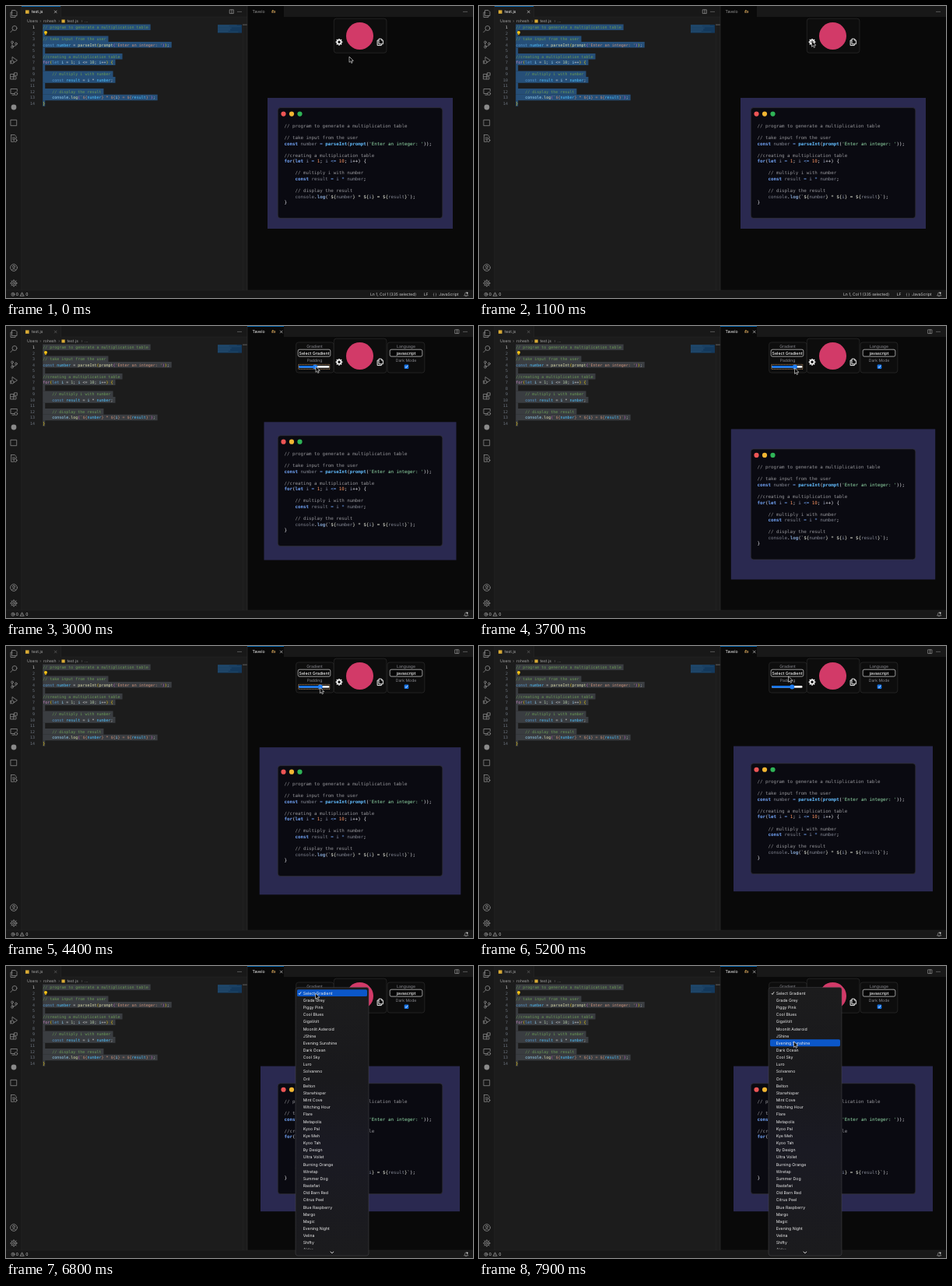
An HTML page for the animation above (8000 ms loop, 600 by 375 pixels).

```html
<!DOCTYPE html>
<html lang="en">
<head>
<meta charset="utf-8">
<title>Code preview</title>
<style>
html, body { margin: 0; width: 100%; height: 100%; overflow: hidden; background: #1c1c1c; }
svg { display: block; width: 100%; height: 100%; }
text { white-space: pre; text-rendering: geometricPrecision; font-family: Inter, Roboto, sans-serif; }
.mono { font-family: "DejaVu Sans Mono", "Liberation Mono", monospace; }
.icon { fill: none; stroke: #8a8a8a; stroke-width: .8; stroke-linejoin: round; stroke-linecap: round; }
</style>
</head>
<body>
<svg id="stage" viewBox="0 0 600 375" preserveAspectRatio="none"></svg>
<script>
const LOOP = 8000, STEP = 100;
const FOCUS_AT = 1400, DRAG_AT = 2800, DRAG_END = 4900, MENU_AT = 6200;
const ROW = 9.16, ROW_TOP = 30.2;

// Each piece of code starts with a one-letter token class
const CODE = [
  "m// program to generate a multiplication table",
  "",
  "m// take input from the user",
  "kconst|p |vnumber|o = |fparseInt|b(|fprompt|d(|s'Enter an integer: '|d)|b)|p;",
  "",
  "m//creating a multiplication table",
  "wfor|b(|klet|p |ii|o = |n1|p; |ii|o <= |n10|p; |ii|p++|b) {",
  "",
  "p    |m// multiply i with number",
  "p    |kconst|p |vresult|o = |ii|o * |vnumber|p;",
  "",
  "p    |m// display the result",
  "p    |cconsole|p.|glog|d(|q`${|vnumber|q} * ${|ii|q} = ${|vresult|q}`|d)|p;",
  "b}"
].map(l => l ? l.split("|").map(s => [s[0], s.slice(1)]) : []);

const EDITOR = { m: "#6a9955", k: "#569cd6", w: "#c586c0", v: "#4fc1ff", f: "#dcdcaa", s: "#ce9178",
  n: "#b5cea8", i: "#9cdcfe", c: "#9cdcfe", g: "#dcdcaa", q: "#ce9178", p: "#d4d4d4", o: "#d4d4d4",
  b: "#ffd700", d: "#da70d6" };
const PREVIEW = { m: "#96969a", k: "#74a6fa", w: "#74a6fa", v: "#828692", f: "#62bbfc", s: "#96e0ac",
  n: "#f5905f", i: "#8e96b0", c: "#828692", g: "#84a4d0", q: "#e4e6d8", p: "#ececf2", o: "#74a6fa",
  b: "#ececf2", d: "#ececf2" };

const GRADIENTS = ["Select Gradient", "Grade Grey", "Piggy Pink", "Cool Blues", "GigaVolt",
  "Moonlit Asteroid", "JShine", "Evening Sunshine", "Dark Ocean", "Cool Sky", "Luro", "Solvareno",
  "Oril", "Belton", "Starwhisper", "Mint Cove", "Witching Hour", "Flare", "Metapolis", "Kyoo Pal",
  "Kye Meh", "Kyoo Tah", "By Design", "Ultra Voilet", "Burning Orange", "Wiretap", "Summer Dog",
  "Rastafari", "Old Barn Red", "Citrus Peel", "Blue Raspberry", "Margo", "Magic", "Evening Night",
  "Velina", "Shifty"];

const esc = s => s.replace(/&/g, "&amp;").replace(/</g, "&lt;");
const rect = (x, y, w, h, fill, more = "") =>
  `<rect x="${x}" y="${y}" width="${w}" height="${h}" fill="${fill}" ${more}/>`;
const dot = (x, y, r, fill, more = "") => `<circle cx="${x}" cy="${y}" r="${r}" fill="${fill}" ${more}/>`;
const path = (d, more = "") => `<path d="${d}" ${more}/>`;
const text = (x, y, s, fill = "#ccc", size = 5.2, more = "") =>
  `<text x="${x}" y="${y}" font-size="${size}" fill="${fill}" xml:space="preserve" ${more}>${esc(s)}</text>`;
const group = (id, body, more = "") => `<g id="${id}" ${more}>${body}</g>`;
const icon = (x, y, d) => `<g class="icon" transform="translate(${x} ${y})">${d}</g>`;
const mid = 'text-anchor="middle"';
const lineLength = line => line.reduce((sum, [, s]) => sum + s.length, 0);

function code(x, y, pitch, size, colors, bold) {
  return CODE.map((line, n) => {
    const spans = line.map(([k, s]) =>
      `<tspan fill="${colors[k]}"${bold.includes(k) ? ' font-weight="700"' : ""}>${esc(s)}</tspan>`).join("");
    return `<text class="mono" x="${x}" y="${y + n * pitch}" font-size="${size}" xml:space="preserve">${spans}</text>`;
  }).join("");
}

const gear = (ring, tip) => dot(0, 0, ring, "none") +
  [...Array(8)].map((_, k) => path(`M0 ${-ring}V${-tip}`, `transform="rotate(${k * 45})"`)).join("");
const close = (x, color) => path(`M${x - 1.7} 5.8l3.4 3.4m0-3.4l-3.4 3.4`, `stroke="${color}" stroke-width=".7"`);
const dots = x => [-2, 0, 2].map(d => dot(x + d, 7.3, .5, "#bbb")).join("");
const split = x => icon(x, 7.2, path("M-2.4 -2.4h4.8v4.8h-4.8zM0 -2.4v4.8"));

function sidebar() {
  return rect(0, 0, 20, 365, "#181818") + rect(19.6, 0, .5, 365, "#292929") +
    icon(10, 10, path("M-2 -4.5h4l2 2v5h-6zM-2 -2h-2v6.5h6v-2")) +
    icon(10, 29.5, dot(1, -1, 3, "none") + path("M-1.2 1.2L-4.3 4.3")) +
    icon(10, 49.5, dot(-2, -3, 1.4, "none") + dot(-2, 3.2, 1.4, "none") + dot(3, -1, 1.4, "none") +
      path("M-2 -1.5v3.2M3 .5q0 1.7-4.3 1.7")) +
    icon(10, 70, path("M-2 -1v-3.6l6.4 4.3-4 2.8") + dot(-1.8, 2, 2, "none") + path("M-4.6 .4h1M-4.8 2h1M-4.6 3.8h1")) +
    icon(10, 90, path("M-4 -2.5h3.8v6.5h-3.8zM-4 .8h7v3.2h-3.2M.9 -4.2h3.4v3.4h-3.4z")) +
    icon(10, 110, path("M1 2.5h-5v-6h8.3v3M-2 4.2h2.5") + dot(2.8, 2.6, 1.9, "none")) +
    dot(10, 130, 3.4, "#8a8a8a") +
    icon(10, 150, path("M-3.7 -3.7h7.4v7.4h-7.4z")) +
    icon(10, 170, path("M-3.4 -4.5h4.5l2.2 2.2v2M-3.4 -4.5v8.8h3M-1.6 -1h3M-1.6 1h1.6") + dot(2, 2.5, 2, "none")) +
    icon(10, 336, dot(0, 0, 4.4, "none") + dot(0, -1.2, 1.5, "none") + path("M-2.8 3.2q2.8-3.6 5.6 0")) +
    icon(10, 356, gear(3.3, 4.4) + dot(0, 0, 1.4, "none"));
}

function editor() {
  const y0 = 29, pitch = 7.52, cw = 3.01;
  const sel = CODE.map((line, n) => {
    const len = lineLength(line) + (n < 13 ? 1 : 0);
    return path(`M47.2 ${23.4 + n * pitch}h${len * cw}v${pitch + .05}h${-len * cw}z`);
  }).join("");
  const nums = CODE.map((_, n) =>
    text(37, y0 + n * pitch, String(n + 1), n ? "#6e7681" : "#d0d0d0", 5, 'class="mono" text-anchor="end"')).join("");
  const map = CODE.map((line, n) =>
    rect(272, 24.3 + n * .72, lineLength(line) * .55, .35, "#5f8fae", 'opacity=".45"')).join("");
  return rect(20, 0, 290, 365, "#1c1c1c") + rect(20, 0, 290, 14, "#181818") + rect(20, 0, 50, 14.5, "#1c1c1c") +
    rect(70, 0, .5, 14, "#2b2b2b") + rect(70, 13.8, 240, .4, "#2b2b2b") +
    rect(25, 5.4, 4.6, 4.4, "#d9ab35") + text(33, 9.2, "test.js", "#fff", 5.1, 'id="fileName"') +
    `<g id="fileClose">${close(63.7, "#ccc")}</g>` + dots(300) +
    text(27, 21.3, "Users", "#a4a4a4", 5.1) + text(43.2, 21.2, "›", "#777") +
    text(48, 21.3, "rohesh", "#a4a4a4", 5.1) + text(67.2, 21.2, "›", "#777") +
    rect(71.5, 17.5, 4.2, 4, "#d9ab35") + text(78.5, 21.3, "test.js", "#a4a4a4", 5.1) +
    text(96.6, 21.2, "›", "#777") + text(101, 21.3, "...", "#a4a4a4", 5.1) +
    group("selection", sel) + nums + code(47.2, y0, pitch, 5, EDITOR, "") +
    dot(51, 33.9, 2, "#f5c518") + rect(50.1, 35.6, 1.8, 1.6, "#c99a10") +
    rect(272, 24, 31, 10.6, "#14395c") + map +
    rect(304, 23, .4, 342, "#2a2a2a") + rect(304, 23.5, 6, 1.2, "#555");
}

function statusBar() {
  return rect(0, 365, 600, 10, "#181818") + rect(0, 364.8, 600, .4, "#2b2b2b") +
    icon(9, 370.3, dot(0, 0, 2.1, "none") + path("M-.8 -.8l1.6 1.6m0-1.6l-1.6 1.6")) + text(12.8, 372.2, "0", "#ccc") +
    icon(20.8, 370.3, path("M0 -2.2l2.4 4.2h-4.8zM0 -.6v1.1")) + text(25.3, 372.2, "0", "#ccc") +
    group("fileStatus", text(468, 372.2, "Ln 1, Col 1 (335 selected)", "#ccc", 5) + text(536.8, 372.2, "LF", "#ccc", 5) +
      text(548.5, 372.2, "{ }", "#ccc", 4.4) + text(556.3, 372.2, "JavaScript", "#ccc", 5)) +
    icon(591, 370.2, path("M-2.2 1.4q1-1 1-2.4q.2-1.4 1.4-1.4t1.4 1.4q0 1.4 1 2.4zM-.5 2.4h1.2")) + dot(592.6, 368.6, 1, "#ddd");
}

const panel = (x, y, w, h) => rect(x, y, w, h, "#0d0d0d", 'rx="3" stroke="#2d2d2d" stroke-width=".7"');
const label = (x, y, s) => text(x, y, s, "#8a8a90", 5.1, mid);
const button = (x, w, s) => rect(x, 30.2, w, 8.9, "#050505", 'rx="1.8" stroke="#d8d8d8" stroke-width=".7"') +
  text(x + w / 2, 36.6, s, "#fff", 5.3, mid + ' font-weight="500"');

function options() {
  return panel(372.7, 21, 48.4, 39) + panel(490, 21, 47.8, 39) +
    label(396.5, 28, "Gradient") + button(375.2, 41.6, "Select Gradient") + label(396.5, 46, "Padding") +
    rect(376, 51, 39.5, 2.8, "#f0f0f0", 'rx="1.4"') + rect(376, 51, 16, 2.8, "#1673e6", 'rx="1.4" id="fill"') +
    dot(392, 52.4, 3, "#1f7cf0", 'id="thumb"') +
    rect(375.8, 49.4, 40, 6, "none", 'id="ring" stroke="#d6a878" stroke-width=".9" stroke-dasharray="1 1"') +
    label(514, 28, "Language") + button(493.2, 41.6, "javascript") + label(514, 46, "Dark Mode") +
    rect(511.7, 49.4, 5.6, 5.6, "#1673e6", 'rx="1.1"') +
    path("M513 52.3l1.1 1.2 1.9-2.7", 'fill="none" stroke="#fff" stroke-width=".8"');
}

function preview() {
  return rect(336, 118, 238, 168, "#2a2950", 'id="backdrop"') +
    group("card", rect(349.2, 130.6, 211.6, 142, "#0a0a11", 'rx="3.6" stroke="#34343c" stroke-width=".7"') +
      dot(356.5, 138.6, 3.1, "#ee5555") + dot(367, 138.6, 3.1, "#f2b632") + dot(377.5, 138.6, 3.1, "#2fb457") +
      code(357.5, 156, 7.55, 5.84, PREVIEW, "kwfg"));
}

function viewer() {
  return rect(310, 0, 290, 365, "#090909") + rect(310, 0, 290, 14, "#181818") +
    rect(310, 0, 47, 14, "#090909") + rect(309.7, 0, .6, 365, "#333") +
    text(316.5, 9.2, "Tavelo", "#9a9a9a", 5.2, 'id="viewName"') +
    rect(341.2, 6, 5, 3, "#8a6a3c", 'rx=".7"') + rect(342, 5.3, 1.6, .9, "#d9b24c") + dot(343.7, 7.6, .9, "#222") +
    dots(590) + preview() + group("options", options()) + panel(421.3, 16.2, 67.6, 44) +
    dot(454.5, 38.5, 17.5, "#d23a68") +
    `<g transform="translate(428 46.3)" fill="none" stroke="#f4f4f4" stroke-width="1.6">${gear(2.5, 4.4)}</g>` +
    path("M479 42.2h3.4l2 2v4.6h-5.4zM479 44h-1.9v6.6h5.2v-1.6", 'fill="none" stroke="#eee" stroke-width="1"') +
    path("M482.2 42.2v2.2h2.2z", 'fill="#eee"');
}

function menu() {
  const rows = GRADIENTS.map((s, n) => text(381.7, 36.7 + n * ROW, s, "#ececec", 5.2)).join("");
  return rect(372, 27.4, 94, 344.6, "url(#menuFill)", 'rx="3" stroke="#48484c" stroke-width=".5"') +
    rect(374, ROW_TOP, 90, 8.9, "#0b57c9", 'rx="1.6" id="hover"') + rows +
    `<g clip-path="url(#cut)">${text(381.7, 36.7 + 36 * ROW, "Alder", "#ececec", 5.2)}</g>` +
    path("M375.8 35.1l1.2 1.4 2.1-3.2", 'fill="none" stroke="#fff" stroke-width=".8"') +
    path("M416.7 366.8l2.2 2 2.2-2", 'fill="none" stroke="#eee" stroke-width=".9"');
}

document.getElementById("stage").innerHTML =
  `<defs><linearGradient id="menuFill" x2="0" y2="1"><stop offset="0" stop-color="#1c1c1d"/>
   <stop offset=".33" stop-color="#19191c"/><stop offset=".6" stop-color="#1a1a23"/><stop offset="1" stop-color="#1b1b1d"/>
   </linearGradient><clipPath id="cut"><rect x="372" y="360" width="94" height="3.6"/></clipPath></defs>` +
  editor() + sidebar() + viewer() + statusBar() +
  group("fileActive", rect(20, 0, 50, .8, "#0078d4") + split(290)) +
  group("viewActive", rect(310, 0, 47, .8, "#0078d4") + close(353.7, "#ccc") + split(579.5)) +
  group("menu", menu()) +
  group("cursor", path("M0 0v7.4l1.7-1.6 1.1 2.6 1.3-.6-1.1-2.5h2.4z", 'fill="#050505" stroke="#f4f4f4" stroke-width=".6"'));

const $ = id => document.getElementById(id);
const show = (id, on) => { $(id).style.display = on ? "" : "none"; };
const set = (id, attrs) => { for (const k in attrs) $(id).setAttribute(k, attrs[k]); };

const PADDING = [[0, 13], [2800, 13], [3000, 17.5], [3600, 25.2], [4100, 25.2], [4600, 22]];
const POINTER = [[0, 441, 65], [300, 441, 65], [1100, 427.5, 45], [1500, 427.5, 45], [2200, 396, 54.5],
  [2700, 396, 53.5], [3000, 398, 52], [3600, 405.5, 54], [4100, 405.5, 54], [4600, 402.3, 53],
  [4800, 402.3, 53], [5200, 397.5, 39], [5800, 397.5, 35], [6900, 397.5, 35], [7900, 404.5, 97]];

function track(keys, t, col, ease = u => u) {
  const n = keys.findIndex(k => k[0] > t);
  if (n < 0) return keys[keys.length - 1][col];
  const a = keys[n - 1], b = keys[n];
  return a[col] + (b[col] - a[col]) * ease((t - a[0]) / (b[0] - a[0]));
}
const smooth = u => u * u * (3 - 2 * u);

function draw(t) {
  const onView = t >= FOCUS_AT;
  show("fileActive", !onView);
  show("fileStatus", !onView);
  show("viewActive", onView);
  show("options", onView);
  set("selection", { fill: onView ? "#3a3d41" : "#264f78" });
  set("fileName", { fill: onView ? "#a8a8a8" : "#fff" });
  set("fileClose", { opacity: onView ? .4 : 1 });
  set("viewName", { fill: onView ? "#fff" : "#9a9a9a" });

  const d = track(PADDING, t, 1) - 13;
  set("backdrop", { x: 336 - d, width: 238 + 2 * d, y: 118 + 1.18 * d, height: 168 + 2.06 * d });
  set("card", { transform: `translate(0 ${2.24 * d})` });
  const knob = 392 + 1.14 * d;
  set("thumb", { cx: knob });
  set("fill", { width: knob - 376 });
  show("ring", t >= DRAG_AT && t < DRAG_END);

  const x = track(POINTER, t, 1, smooth), y = track(POINTER, t, 2, smooth);
  set("cursor", { transform: `translate(${x} ${y})` });
  show("menu", t >= MENU_AT);
  set("hover", { y: ROW_TOP + ROW * Math.max(0, Math.floor((y - ROW_TOP) / ROW)) });
}

const start = performance.now();
function tick() {
  const t = (performance.now() - start) % LOOP;
  draw(Math.floor(t / STEP) * STEP);
  requestAnimationFrame(tick);
}
draw(0);
requestAnimationFrame(tick);
</script>
</body>
</html>
```
